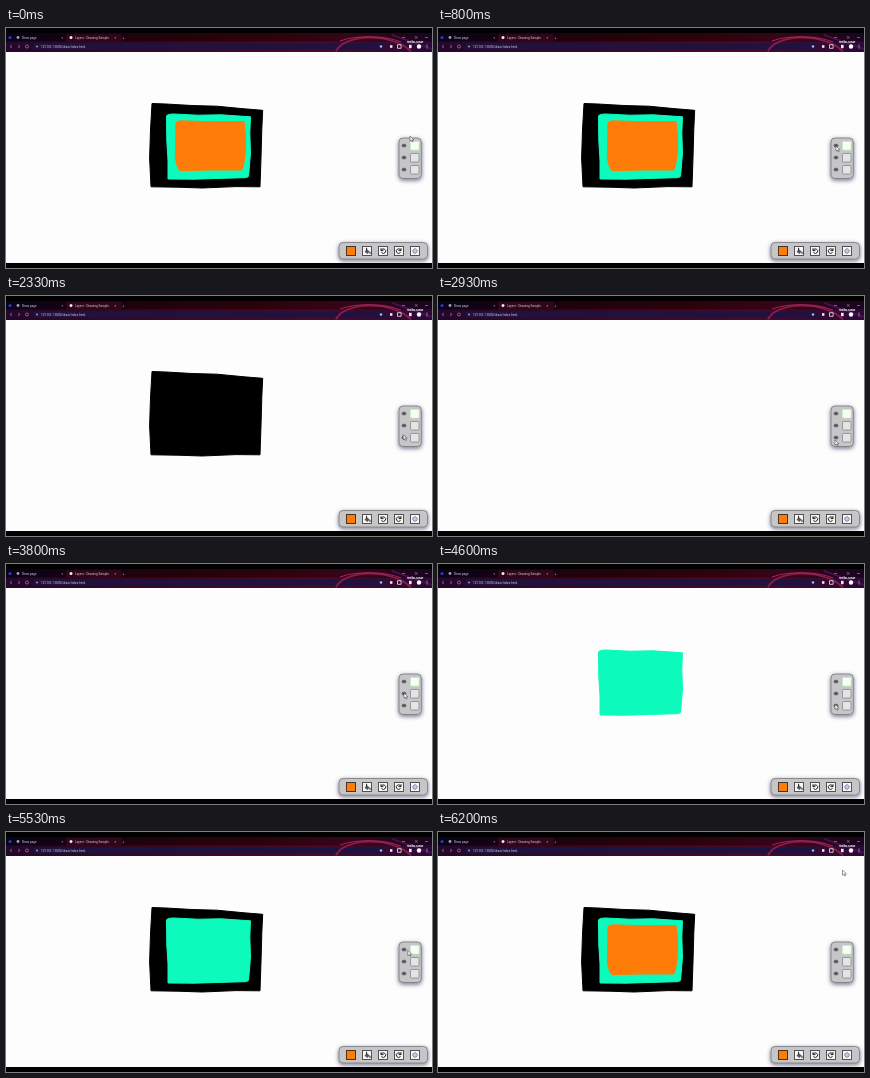
These frames come from a looping animation (426 by 240 pixels, 6270 ms). An HTML page:

```html
<!DOCTYPE html>
<html lang="en">
<head>
<meta charset="utf-8">
<title>Layer toggles</title>
<style>
html, body { margin: 0; width: 100%; height: 100%; overflow: hidden; background: #000; }
svg { display: block; width: 100vw; height: 100vh; }
text { font-family: Roboto, "Liberation Sans", sans-serif; }
.tab { font-size: 3.1px; fill: #d8cdd4; }
.paint { stroke-width: 1; stroke-linejoin: round; }
.icon { fill: none; stroke: #222; stroke-width: 1; stroke-linecap: round; stroke-linejoin: round; }
</style>
</head>
<body>
<svg viewBox="0 0 426 240" preserveAspectRatio="none">
  <defs>
    <linearGradient id="strip">
      <stop offset="0" stop-color="#08031a"/>
      <stop offset=".25" stop-color="#1c020c"/>
      <stop offset=".6" stop-color="#2c020c"/>
      <stop offset=".8" stop-color="#360518"/>
      <stop offset="1" stop-color="#1a0420"/>
    </linearGradient>
    <linearGradient id="row">
      <stop offset="0" stop-color="#24072c"/>
      <stop offset=".35" stop-color="#3c0722"/>
      <stop offset=".75" stop-color="#480a2a"/>
      <stop offset="1" stop-color="#2b0838"/>
    </linearGradient>
    <filter id="shade" x="-40%" y="-40%" width="180%" height="200%">
      <feDropShadow dx="0" dy="1.5" stdDeviation="2.2" flood-color="#15153a" flood-opacity=".6"/>
    </filter>
  </defs>

  <rect width="426" height="240" fill="#000"/>
  <rect y="24" width="426" height="211" fill="#fdfdfd"/>

  <g id="browser">
    <rect y="5" width="426" height="9" fill="url(#strip)"/>
    <rect y="13.5" width="426" height="10.5" fill="url(#row)"/>
    <rect x="60" y="6" width="56" height="8" rx="1.5" fill="#30061a"/>
    <rect x="27" y="15.5" width="353" height="6" rx="3" fill="#20123f"/>
    <g fill="none">
      <path d="M330 23.5C337 6 386 4 405 23.5" stroke="#8a1c48" stroke-width="1.8"/>
      <path d="M334 13C350 7 379 7 395 14" stroke="#b02a5c" stroke-width=".9"/>
      <path d="M386 7L426 21" stroke="#4a1255" stroke-width="1.6"/>
    </g>
    <circle cx="4" cy="9.5" r="1.6" fill="#2b3bb0"/>
    <circle cx="12" cy="9.5" r="1.4" fill="#9ba4b8"/>
    <circle cx="65" cy="9.5" r="1.5" fill="#eee"/>
    <text class="tab" x="16" y="10.6">Draw page</text>
    <text class="tab" x="69" y="10.6">Layers - Drawing Sample</text>
    <text class="tab" x="55.5" y="10.8">×</text>
    <text class="tab" x="108.5" y="10.8">×</text>
    <text class="tab" x="116.5" y="10.8">+</text>
    <g fill="none" stroke="#b09bb0" stroke-width=".6">
      <path d="M6 17L4 18.5L6 20M12 17L14 18.5L12 20"/>
      <circle cx="21" cy="18.5" r="1.5"/>
      <path d="M396 9.5h3M409 8.2l2.5 2.5m0-2.5l-2.5 2.5M419 9.5h3"/>
    </g>
    <circle cx="31" cy="18.5" r="1" fill="#a99"/>
    <text class="tab" x="35" y="19.7">127.0.0.1:5500/draw/index.html</text>
    <circle cx="375" cy="18.5" r="1.3" fill="#9cb5f0"/>
    <path d="M384 17.2h2.4v2.6h-2.4z" fill="#eee"/>
    <path d="M391.5 16.7h3.6v3.6h-3.6z" fill="none" stroke="#eee" stroke-width=".8"/>
    <path d="M403 16.8h2.6v3.4h-2.6z" fill="#eee"/>
    <circle cx="413" cy="18.5" r="2.2" fill="#fff"/>
    <path d="M421 16.6v4" stroke="#ddd" stroke-width=".9" stroke-dasharray=".8 .7"/>
    <text x="401" y="14.6" font-size="4.3" font-weight="700" fill="#fff">velo.use</text>
  </g>

  <path id="back" class="paint" fill="#000" stroke="#000" d="M146 75.5L160 76L186 77.5L211 78.2L238 80.8L256.7 82.3L255.8 101L255 130L254 158.8L230 158.6L196 160L172 159.2L145 158.8L143.6 130L144.5 102Z"/>
  <path id="middle" class="paint" fill="#0cfabc" stroke="#0cfabc" d="M160.5 88Q161 86 168 86L192 87.2L215 86.8L244.5 88.8L243.8 105L244.5 125L242.6 148Q242 150 236 149.8L214 150.4L188 151.2L162 151L162 132L160.8 113Z"/>
  <path id="front" class="paint" fill="#ff7c08" stroke="#ff7c08" d="M169.8 95Q171 92.8 176 92.8L205 93.8L238 93.6L239.5 106L239.3 124L237.8 136L235.8 142L206 142L174 142.6Q171 140 169.3 130L169.8 112Z"/>

  <g filter="url(#shade)">
    <rect x="393" y="110" width="22.3" height="40.5" rx="4" fill="#c6c6c8" stroke="#77777b" stroke-width=".8"/>
  </g>
  <g filter="url(#shade)">
    <rect x="333" y="214.5" width="88.5" height="16.5" rx="4" fill="#c6c6c8" stroke="#77777b" stroke-width=".8"/>
  </g>
  <g id="rows"></g>

  <g id="tools">
    <rect x="340.5" y="218.5" width="9" height="9" fill="#ff7c08" stroke="#4a321f"/>
    <g fill="#f7f7f7" stroke="#444" stroke-width=".9">
      <rect x="356.5" y="218.5" width="9" height="9"/>
      <rect x="372.5" y="218.5" width="9" height="9"/>
      <rect x="388.5" y="218.5" width="9" height="9"/>
      <rect x="404.5" y="218.5" width="9" height="9"/>
    </g>
    <path d="M358.5 223.8l2.3-2.6 2.9 2.4-2.3 2.3z" fill="#555"/>
    <path class="icon" d="M360.6 220.2v2M364 224.2v1.4"/>
    <path id="undo" class="icon" d="M375 220.6v2h2M375.2 222.4a2.3 2.3 0 1 1 .5 2.3"/>
    <use href="#undo" transform="translate(770 0) scale(-1 1)"/>
    <circle class="icon" cx="409" cy="223" r="2.1" stroke-dasharray="1.1 .55" style="stroke:#6669a0"/>
    <circle cx="409" cy="223" r=".8" fill="#8c8fbd"/>
  </g>

  <path id="cursor" d="M0 0V5.2L1.3 4.1L2.2 6L3.1 5.6L2.2 3.8H3.8Z" fill="#fff" stroke="#333" stroke-width=".5"/>
</svg>
<script>
const LOOP = 6270, STEP = 200 / 3;
const byId = id => document.getElementById(id);

// hidden from / shown again, in ms
const layers = [
  { id: 'front', y: 118, off: 1130, on: 5730 },
  { id: 'middle', y: 130, off: 1930, on: 3930 },
  { id: 'back', y: 142, off: 2670, on: 4800 }
];

// time, x, y of the pointer
const path = [
  [0, 404, 108], [500, 399, 117], [800, 398, 118],
  [1200, 398, 118], [1600, 398, 128], [2000, 398, 129], [2400, 397, 142],
  [2930, 397, 144], [3400, 397, 140], [3700, 398, 129], [4050, 398, 129],
  [4450, 397, 140], [4850, 397, 141], [5300, 401, 120], [5530, 402, 118],
  [5800, 399, 117], [6070, 404, 65], [6200, 404.5, 38], [LOOP, 405, 36]
];

byId('rows').innerHTML = layers.map(({ y }, i) => `
  <ellipse cx="398" cy="${y - .4}" rx="2.1" ry="1.5" fill="#77747a" stroke="#505056" stroke-width=".6"/>
  <circle cx="398" cy="${y - .4}" r=".75" fill="#35353b"/>
  <rect x="404.5" y="${y - 4.5}" width="8.5" height="8.5" rx=".8"
    fill="${i ? '#e4e4e4' : '#f5fff2'}" stroke="${i ? '#88888c' : '#c7edc2'}" stroke-width=".8"/>`).join('');

function pointer(t) {
  const i = path.findIndex(p => p[0] > t);
  const [a, b] = [path[i - 1], path[i]];
  const k = (t - a[0]) / (b[0] - a[0]);
  const e = k * k * (3 - 2 * k);
  return [1, 2].map(n => a[n] + (b[n] - a[n]) * e);
}

function draw(now) {
  const t = Math.floor((now % LOOP + 1) / STEP) * STEP;
  for (const { id, off, on } of layers)
    byId(id).style.display = t >= off && t < on ? 'none' : '';
  byId('cursor').setAttribute('transform', `translate(${pointer(t)})`);
  requestAnimationFrame(() => draw(performance.now()));
}
draw(0);
</script>
</body>
</html>
```
